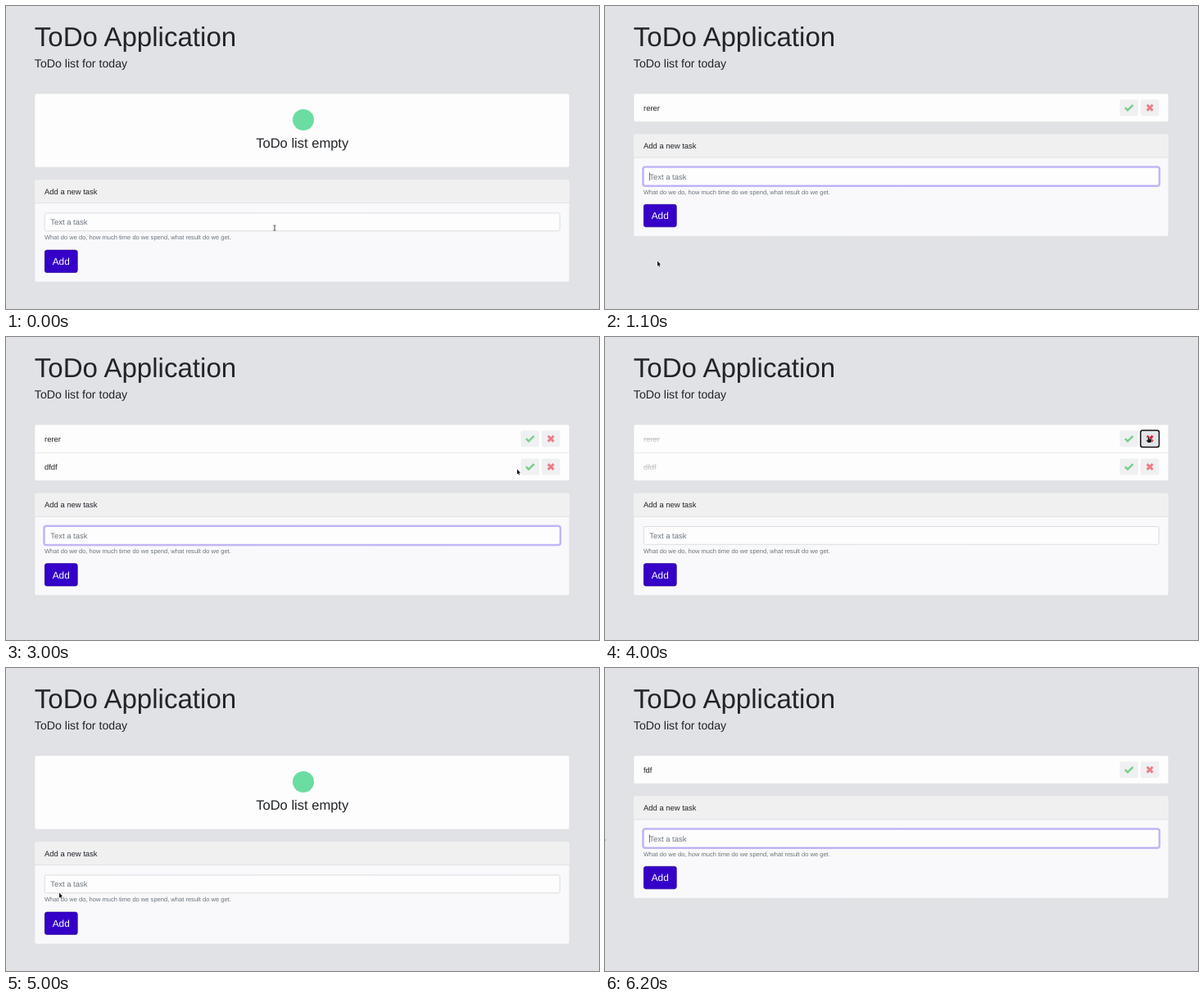
Write an HTML page with a canvas that moves like this. It is 724x370 px and loops after 6.3 s.

```html
<!DOCTYPE html>
<html lang="en">
<head>
<meta charset="utf-8">
<title>ToDo Application</title>
<style>
html, body { margin: 0; height: 100%; overflow: hidden; background: #e1e2e5; }
canvas { display: block; }
</style>
</head>
<body>
<canvas id="stage" width="724" height="370"></canvas>
<script>
const ctx = document.getElementById('stage').getContext('2d');
const LOOP = 6300, STEP = 100;
const LEFT = 35, WIDTH = 653, LIST_TOP = 107, ROW = 34.3;

// State changes; a leading "~" marks a finished task
const state = (at, rows, text = '', focus = false, ring = '') =>
  ({ at, rows: rows ? rows.split(' ') : [], text, focus, ring });
const typing = (at, rows, word) =>
  [...word].map((_, i) => state(at + i * 100, rows, word.slice(0, i + 1), true));
const states = [
  state(0, ''),
  state(200, '', '', true),
  ...typing(300, '', 'rerer'),
  state(1000, 'rerer', '', true),
  ...typing(2000, 'rerer', 'dfdf'),
  state(2500, 'rerer dfdf', '', true),
  state(3300, 'rerer ~dfdf', '', false, '1check'),
  state(3600, '~rerer ~dfdf', '', false, '0check'),
  state(3900, '~rerer ~dfdf', '', false, '0cross'),
  state(4200, '~dfdf'),
  state(4300, '~dfdf', '', false, '0cross'),
  state(4400, ''),
  state(5100, '', '', true),
  ...typing(5200, '', 'fdf'),
  state(5800, 'fdf', '', true)
];

// Pointer stops: time, x, y, shape from there on
const stops = [
  [0, 328, 271, 'beam'], [200, 310, 266, 'beam'], [500, 200, 268, 'beam'],
  [700, 90, 285, 'arrow'], [800, 67, 308, 'hand'], [1000, 64, 312, 'arrow'],
  [1200, 64, 311, 'arrow'], [1500, 68, 298, 'arrow'], [2100, 120, 264, 'beam'],
  [2400, 124, 263, 'hand'], [2500, 72, 257, 'arrow'], [2700, 72, 285, 'hand'],
  [2800, 80, 292, 'arrow'], [3000, 624, 161.5, 'arrow'], [3100, 638, 158, 'hand'],
  [3300, 638, 157, 'hand'], [3500, 638, 122, 'hand'], [3600, 638, 122, 'hand'],
  [3800, 663, 122, 'hand'], [4500, 663, 122, 'arrow'], [4700, 80, 296, 'arrow'],
  [4800, 80, 296, 'arrow'], [5000, 65, 274.5, 'arrow'], [5100, 66, 266, 'beam'],
  [5400, 66, 268, 'beam'], [5600, 67, 306, 'hand'], [5800, 66, 310, 'arrow'],
  [5900, 60, 300, 'arrow'], [6200, -3, 206, 'arrow'], [6300, -3, 206, 'arrow']
];

function pointerAt(t) {
  const i = stops.findLastIndex(s => s[0] <= t);
  const [t0, x0, y0, shape] = stops[i], [t1, x1, y1] = stops[i + 1];
  const k = (t - t0) / (t1 - t0);
  return { x: x0 + (x1 - x0) * k, y: y0 + (y1 - y0) * k, shape };
}

function box(x, y, w, h, r, fill, stroke, line = 0.6) {
  ctx.beginPath();
  ctx.roundRect(x, y, w, h, r);
  if (fill) { ctx.fillStyle = fill; ctx.fill(); }
  if (stroke) { ctx.strokeStyle = stroke; ctx.lineWidth = line; ctx.stroke(); }
}

function label(text, x, y, size = 9.45, color = '#212529', align = 'left') {
  ctx.font = `${size}px "Liberation Sans", Arial, sans-serif`;
  ctx.textRendering = 'geometricPrecision';
  ctx.textAlign = align;
  ctx.fillStyle = color;
  ctx.fillText(text, x, y);
  return ctx.measureText(text).width;
}

function polyline(points, color, width) {
  ctx.beginPath();
  points.forEach(([x, y]) => ctx.lineTo(x, y));
  ctx.strokeStyle = color;
  ctx.lineWidth = width;
  ctx.stroke();
}

function iconButton(kind, x, y, pointer, ring) {
  const hover = Math.abs(pointer.x - x) < 11 && Math.abs(pointer.y - y) < 10;
  box(x - 11.2, y - 10, 22.4, 20, 2.2, hover ? '#e4e5e8' : '#eff0f2');
  if (ring) box(x - 11.3, y - 10.3, 22.6, 20.6, 2.5, null, '#101010', 1.5);
  if (kind === 'check') {
    polyline([[x - 4.7, y], [x - 1.6, y + 3.1], [x + 4.9, y - 3.4]], hover ? '#28a745' : '#79cf8b', 2.5);
  } else {
    const color = hover ? '#d81f32' : '#ec7d86';
    for (const s of [1, -1]) polyline([[x - 3.4, y - 3.4 * s], [x + 3.4, y + 3.4 * s]], color, 2.9);
  }
}

function drawList(rows, ring, pointer) {
  const height = rows.length ? rows.length * ROW : 90;
  box(LEFT, LIST_TOP, WIDTH, height, 2.2, '#fdfdfd', '#d9dadd', 0.5);
  if (!rows.length) {
    ctx.beginPath();
    ctx.arc(363, 139, 13, 0, Math.PI * 2);
    ctx.fillStyle = '#6bdca2';
    ctx.fill();
    label('ToDo list empty', 361.7, 172.6, 16.54, '#212529', 'center');
  }
  rows.forEach((row, i) => {
    const y = LIST_TOP + i * ROW, done = row[0] === '~';
    const color = done ? '#c3c4c6' : '#212529';
    if (i) { ctx.fillStyle = '#e2e3e5'; ctx.fillRect(LEFT, y - 0.3, WIDTH, 0.7); }
    const width = label(row.replace('~', ''), 47, y + 20.5, 9.45, color);
    if (done) { ctx.fillStyle = color; ctx.fillRect(47, y + 17.2, width, 0.7); }
    iconButton('check', 639.7, y + 17.2, pointer, ring === i + 'check');
    iconButton('cross', 665.2, y + 17.2, pointer, ring === i + 'cross');
  });
  return LIST_TOP + height;
}

function drawForm(top, { text, focus }, caretOn, pointer) {
  box(LEFT, top, WIDTH, 124.8, 2.2, '#f9f9fb', '#d9dadd', 0.5);
  box(LEFT, top, WIDTH, 28.4, [2.2, 2.2, 0, 0], '#f0f0f1');
  ctx.fillStyle = '#dcdddf';
  ctx.fillRect(LEFT, top + 28.1, WIDTH, 0.8);
  label('Add a new task', 47, top + 17.5);

  if (focus) box(46.2, top + 39.7, 631, 23.8, 3, null, '#c3b8f6', 2);
  box(47.2, top + 40.7, 629, 21.8, 2, '#fdfdfe', focus ? '#a99bef' : '#ced1d6', 0.7);
  const width = label(text || 'Text a task', 54.3, top + 55, 9.45, text ? '#495057' : '#6c757d');
  if (focus && caretOn) {
    ctx.fillStyle = '#33373b';
    ctx.fillRect(54.3 + (text ? width : 0), top + 46.8, 0.7, 10);
  }
  label('What do we do, how much time do we spend, what result do we get.', 47, top + 73, 7.56, '#6c757d');

  const hover = pointer.x > 47 && pointer.x < 87.5 && pointer.y > top + 85.5 && pointer.y < top + 113;
  box(47.3, top + 85.8, 40, 27.5, 2.8, hover ? '#2c00aa' : '#3500c8', '#25008c');
  label('Add', 67.2, top + 103.8, 11.8, '#fff', 'center');
}

function drawPointer({ x, y, shape }) {
  if (shape === 'beam') {
    polyline([[x, y - 3], [x, y + 3]], '#333', 0.9);
    for (const dy of [-3, 3]) polyline([[x - 1.5, y + dy], [x + 1.5, y + dy]], '#333', 0.7);
    return;
  }
  const outline = shape === 'hand'
    ? [[0, 0], [1, 0], [1.1, 2.3], [4, 3], [4, 5.5], [3, 7], [0, 7], [-2, 4.5], [-1.3, 3.8], [0, 4.6]]
    : [[0, 0], [0, 6], [1.3, 4.9], [2.3, 7], [3.2, 6.6], [2.3, 4.5], [4, 4.3]];
  ctx.beginPath();
  outline.forEach(([dx, dy]) => ctx.lineTo(x + dx, y + dy));
  ctx.closePath();
  ctx.strokeStyle = '#f4f4f4';
  ctx.lineWidth = 0.8;
  ctx.stroke();
  ctx.fillStyle = '#17181a';
  ctx.fill();
}

function draw(now) {
  const t = Math.floor((now % LOOP) / STEP) * STEP;
  const current = states.findLast(s => s.at <= t);
  const pointer = pointerAt(t);
  ctx.fillStyle = '#e1e2e5';
  ctx.fillRect(0, 0, 724, 370);
  label('ToDo Application', 34.8, 48.6, 33.1);
  label('ToDo list for today', 34.8, 75.2, 14.17);
  const bottom = drawList(current.rows, current.ring, pointer);
  drawForm(bottom + 15.2, current, (t - current.at) % 1000 < 500, pointer);
  drawPointer(pointer);
}

const start = performance.now();
function tick() {
  draw(performance.now() - start);
  requestAnimationFrame(tick);
}
tick();
</script>
</body>
</html>
```
